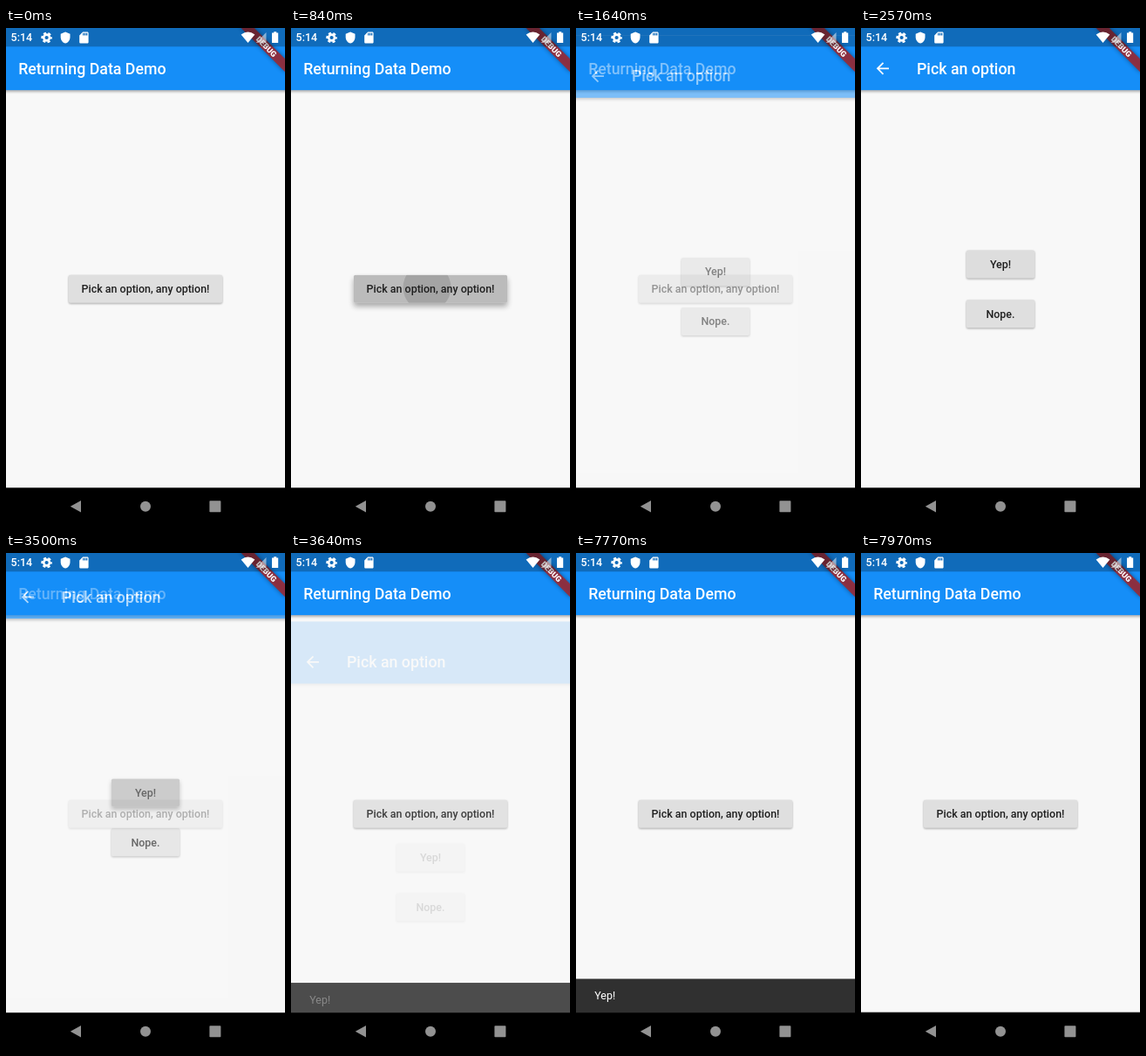
An HTML page for the animation above (8000 ms loop, 320 by 569 pixels).

```html
<!DOCTYPE html>
<html lang="en">
<head>
<meta charset="utf-8">
<title>Returning Data Demo</title>
<style>
  html, body { margin: 0; width: 100%; height: 100%; overflow: hidden; background: #f8f8f8; }
  svg { display: block; width: 100%; height: 100%; font-family: Roboto, sans-serif; }
  text { white-space: pre; }
  .title { font-size: 17.78px; font-weight: 500; fill: #fff; }
  .label { font-size: 12.44px; font-weight: 500; fill: #1f1f1f; text-anchor: middle; }
  .snack { font-size: 12.44px; fill: #fff; }
  .clock { font-size: 12.44px; font-weight: 500; fill: #fff; }
  .debug { font-size: 9.07px; font-weight: 900; fill: #fff; text-anchor: middle; }
  .bar-shadow { filter: blur(1.8px); }
  .banner-shadow { filter: blur(2.4px); }
</style>
</head>
<body>
<svg viewBox="0 0 320 569" preserveAspectRatio="none">
  <defs>
    <g id="page">
      <rect width="320" height="527" fill="#f8f8f8"/>
      <rect class="bar-shadow" x="-6" y="40" width="332" height="33" fill="#000" opacity=".3"/>
      <rect width="320" height="71.1" fill="#158ef8"/>
    </g>
  </defs>

  <g id="home">
    <use href="#page"/>
    <text class="title" x="14.2" y="52.6">Returning Data Demo</text>
  </g>

  <g id="snack">
    <rect y="487.2" width="320" height="40" fill="#303030"/>
    <text class="snack" x="21.3" y="511">Yep!</text>
  </g>

  <g id="picker">
    <use href="#page"/>
    <path transform="translate(14.2 35.7) scale(.889)" fill="#fff"
      d="M20 11H7.83l5.59-5.59L12 4l-8 8 8 8 1.41-1.41L7.83 13H20z"/>
    <text class="title" x="64" y="52.6">Pick an option</text>
  </g>

  <!-- debug ribbon -->
  <g transform="translate(320 0) rotate(45)">
    <rect class="banner-shadow" x="-35.6" y="24.9" width="71.2" height="10.7" opacity=".4"/>
    <rect x="-35.6" y="24.9" width="71.2" height="10.7" fill="#a02832" fill-opacity=".86"/>
    <text class="debug" x="0" y="33.4">DEBUG</text>
  </g>

  <!-- status bar -->
  <rect width="320" height="21.3" fill-opacity=".25"/>
  <text class="clock" x="5.6" y="15.4">5:14</text>
  <g fill="#fff">
    <g fill="none" stroke="#fff">
      <circle cx="46.6" cy="11" r="3.4" stroke-width="2.6"/>
      <circle cx="46.6" cy="11" r="5.2" stroke-width="2.2" stroke-dasharray="3.1 2.345" stroke-dashoffset="1.55"/>
    </g>
    <path transform="translate(60.9 3.8) scale(.6)"
      d="M12 1L3 5v6c0 5.55 3.84 10.74 9 12 5.16-1.26 9-6.45 9-12V5z"/>
    <path transform="translate(81.6 3.2) scale(.65)" fill-rule="evenodd"
      d="M18 2h-8L4 8v12c0 1.1.9 2 2 2h12c1.1 0 2-.9 2-2V4c0-1.1-.9-2-2-2zM12 8h-2V4h2zM15 8h-2V4h2zM18 8h-2V4h2z"/>
    <path d="M277.5 17L269.6 7.4Q277.5 1.8 285.4 7.4Z"/>
    <path d="M298.5 5v12h-12z" opacity=".5"/>
    <path d="M307.2 4.2h3v1.2h2v11.6h-7.2v-11.6h2.2z"/>
  </g>

  <!-- navigation bar -->
  <rect y="526.3" width="320" height="43"/>
  <g fill="#929292">
    <path d="M73.8 547.7L86 541v13.4z"/>
    <circle cx="160" cy="547.7" r="6"/>
    <rect x="233.4" y="541.2" width="13" height="13" rx=".8"/>
  </g>
</svg>

<script>
const NS = 'http://www.w3.org/2000/svg';
const LOOP = 8000;
const PUSH = 1433, POP = 3434, ROUTE = 300;
const SNACK_IN = 3490, SNACK_OUT = 7740, SNACK = 250;
const $ = id => document.getElementById(id);
const clamp = v => Math.min(1, Math.max(0, v));

function add(parent, tag, attrs, text) {
  const el = document.createElementNS(NS, tag);
  for (const k in attrs) el.setAttribute(k, attrs[k]);
  if (text) el.textContent = text;
  return parent.appendChild(el);
}

// Cubic bezier easing solved by bisection
function bezier(x1, y1, x2, y2) {
  const at = (a, b, s) => 3 * a * s * (1 - s) ** 2 + 3 * b * s * s * (1 - s) + s ** 3;
  return x => {
    if (x <= 0 || x >= 1) return clamp(x);
    let lo = 0, hi = 1;
    for (let i = 0; i < 24; i++) {
      const mid = (lo + hi) / 2;
      if (at(x1, x2, mid) < x) lo = mid; else hi = mid;
    }
    return at(y1, y2, lo);
  };
}
const fastOutSlowIn = bezier(.4, 0, .2, 1);
const easeIn = bezier(.42, 0, 1, 1);

// Raised button with highlight, splash and elevation; press = {down, up, x, y, speed}
let clips = 0;
function button(parent, cy, width, label, press) {
  const box = { x: 160 - width / 2, y: cy - 16, width, height: 32, rx: 1.8 };
  const clip = 'clip' + clips++;
  add(add(parent, 'clipPath', { id: clip }), 'rect', box);
  const shadow = add(parent, 'rect', box);
  add(parent, 'rect', { ...box, fill: '#dfdfdf' });
  const ink = add(parent, 'g', { 'clip-path': `url(#${clip})` });
  const glow = add(ink, 'rect', { ...box, opacity: 0 });
  const splash = add(ink, 'circle', { cx: press ? press.x : 160, cy: press ? press.y : cy, r: 0 });
  add(parent, 'text', { class: 'label', x: 160, y: cy + 4.3 }, label);

  return t => {
    let lit = 0, radius = 0, fade = 0;
    if (press && t >= press.down) {
      const held = Math.min(t, press.up) - press.down;
      const after = Math.max(0, t - press.up);
      fade = clamp(1 - after / 200);
      lit = Math.min(clamp(held / 200), fade);
      radius = held * press.speed + after * .889;
    }
    const lift = 2 + 6 * lit;
    shadow.setAttribute('transform', `translate(0 ${lift * .5})`);
    shadow.setAttribute('opacity', .32);
    shadow.style.filter = `blur(${lift * .42}px)`;
    glow.setAttribute('opacity', .16 * lit);
    splash.setAttribute('r', radius);
    splash.setAttribute('opacity', .12 * fade);
  };
}

const picker = $('picker'), snack = $('snack'), snackText = snack.querySelector('text');
const buttons = [
  button($('home'), 298.8, 176.2, 'Pick an option, any option!',
    { down: 490, up: PUSH, x: 156, y: 297, speed: .0785 }),
  button(picker, 270.4, 78.2, 'Yep!',
    { down: 2560, up: POP, x: 160, y: 270, speed: .044 }),
  button(picker, 327.2, 78.2, 'Nope.')
];

// Screen refreshes 15 times a second, on a 10 ms clock
function snap(t) {
  const k = Math.floor((Math.floor(t / 10) * 10 - 500) * 3 / 200);
  return Math.ceil(50 + 20 * k / 3) * 10;
}

function render(t) {
  buttons.forEach(draw => draw(t));

  const route = t < POP ? clamp((t - PUSH) / ROUTE) : clamp(1 - (t - POP) / ROUTE);
  picker.setAttribute('opacity', easeIn(route));
  picker.setAttribute('transform', `translate(0 ${131.5 * (1 - fastOutSlowIn(route))})`);
  picker.style.display = route ? '' : 'none';

  const leaving = t >= SNACK_OUT;
  const shown = leaving ? clamp(1 - (t - SNACK_OUT) / SNACK) : clamp((t - SNACK_IN) / SNACK);
  snack.setAttribute('transform', `translate(0 ${39.1 * (1 - fastOutSlowIn(shown))})`);
  snack.style.display = shown ? '' : 'none';
  snackText.setAttribute('opacity', leaving ? 1 : clamp((shown - .4) / .6));
}

const start = performance.now();
function tick() {
  render(snap((performance.now() - start) % LOOP));
  requestAnimationFrame(tick);
}
tick();
</script>
</body>
</html>
```
